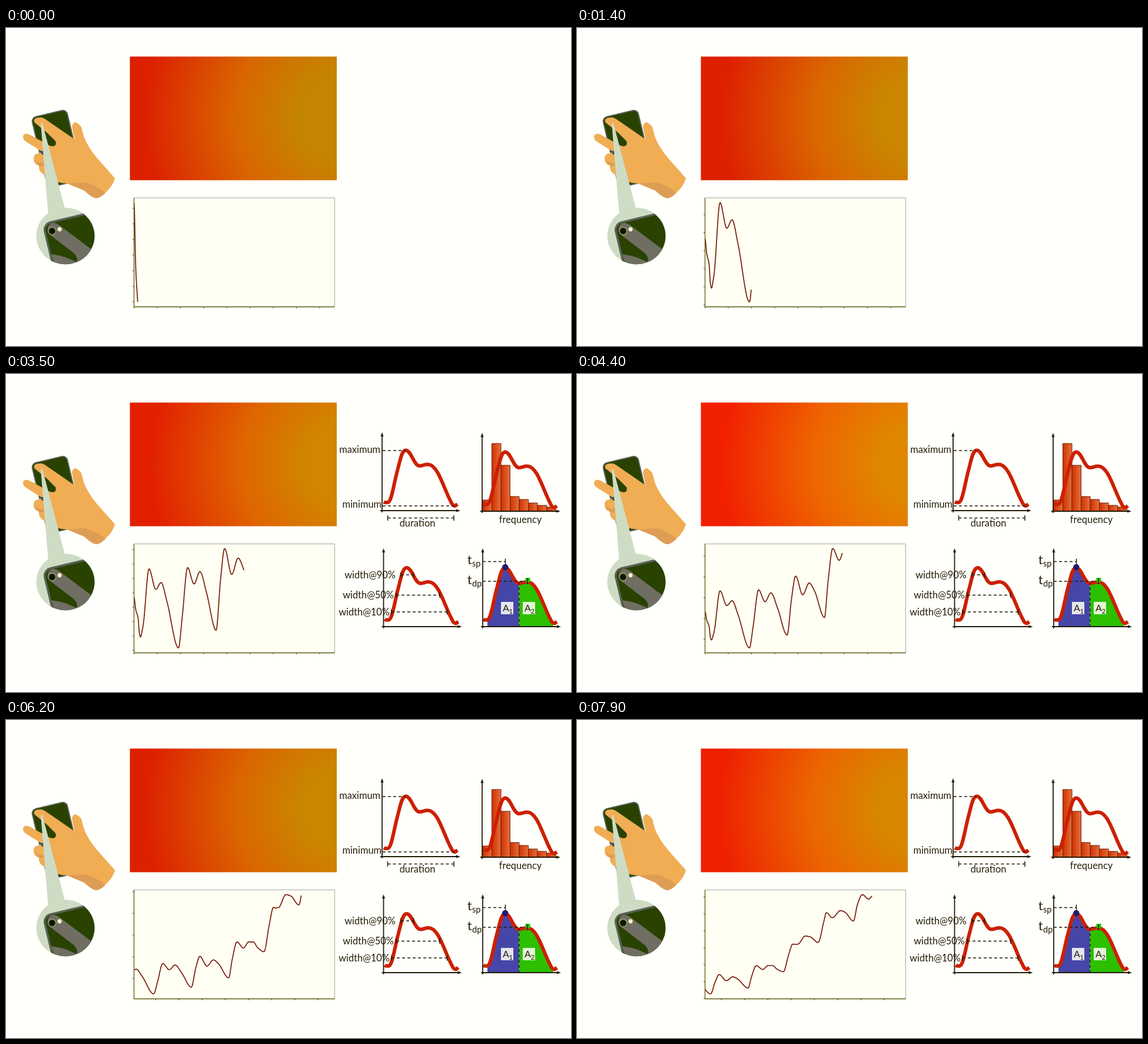
Animation, 960 px wide and 540 px high, one loop 8000 ms. Source, as an HTML page with a canvas:

```html
<!DOCTYPE html>
<html lang="en">
<head>
<meta charset="utf-8">
<title>Pulse wave from a phone camera</title>
<style>
html, body { margin: 0; width: 100%; height: 100%; overflow: hidden; background: #fffffb; }
canvas { display: block; width: 960px; height: 540px; }
</style>
</head>
<body>
<canvas id="stage" width="960" height="540"></canvas>
<script>
const g = document.getElementById('stage').getContext('2d');
const LOOP = 8000, STEP = 100;
const INK = '#241c08', RED = '#cc2000';
const FONT = 'Lato, "Open Sans", sans-serif';

// Turning points of the pulse wave, smoothed by a monotone cubic
const pts = [
  [0, 37], [3, 28], [7, 22], [9, 11], [11, 8], [14, 13], [16, 18], [25.5, 58], [37, 43], [46, 48], [56, 34], [75.5, 0],
  [82, 23], [91, 59], [102, 47], [112, 56], [123.5, 40], [139.5, 13],
  [147, 50], [154, 73], [166, 54], [177, 66], [186, 58], [203, 31],
  [209, 67], [217, 101], [228, 89], [237, 101], [245, 101], [252, 90], [263, 82],
  [272, 135], [279, 168], [283, 167], [288, 168], [300, 193], [309, 190], [322, 173],
  [332, 240], [336, 266], [346, 250], [360, 272], [367, 268], [382, 240],
  [389, 292], [397, 322], [408, 308], [414, 317]
];
const chord = i => (pts[i + 1][1] - pts[i][1]) / (pts[i + 1][0] - pts[i][0]);
const slopes = pts.map((p, i) => {
  if (!i || i === pts.length - 1) return 0;
  const a = chord(i - 1), b = chord(i);
  return a * b > 0 ? 2 * a * b / (a + b) : 0;
});

function wave(x) {
  let i = 0;
  while (i < pts.length - 2 && pts[i + 1][0] < x) i++;
  const h = pts[i + 1][0] - pts[i][0];
  const u = Math.min(1, (x - pts[i][0]) / h), w = 1 - u;
  return w * w * (1 + 2 * u) * pts[i][1] + u * u * (3 - 2 * u) * pts[i + 1][1]
    + h * u * w * (w * slopes[i] - u * slopes[i + 1]);
}

function fill(d, color) { g.fillStyle = color; g.fill(new Path2D(d)); }

function line(x1, y1, x2, y2, color = INK, width = 1.5, dash = []) {
  g.strokeStyle = color; g.lineWidth = width; g.setLineDash(dash);
  g.beginPath(); g.moveTo(x1, y1); g.lineTo(x2, y2); g.stroke();
  g.setLineDash([]);
}
const dashed = (x1, y1, x2, y2) => line(x1, y1, x2, y2, INK, 1.4, [5, 4]);

function text(s, x, y, align = 'left', size = 16.4) {
  g.font = size + 'px ' + FONT; g.textAlign = align; g.fillStyle = INK;
  g.fillText(s, x, y);
}

function disc(x, y, r, color) {
  g.fillStyle = color; g.beginPath(); g.arc(x, y, r, 0, 7); g.fill();
}

function phone(x, y, w, h, r, edge) {
  g.save();
  g.translate(x, y); g.rotate(-0.235);
  g.beginPath(); g.roundRect(0, 0, w, h, r);
  g.fillStyle = '#294200'; g.fill();
  g.lineWidth = edge; g.strokeStyle = '#586054'; g.stroke();
  g.restore();
}

function hand() {
  const skin = '#f0ad54', shade = '#dd9d55';
  fill('M112 168Q113 160 119 160Q124 163 128 168L133 187L118 196Z', skin);
  phone(43, 152.5, 61, 122, 8, 2);
  fill('M48 160Q46 152 57 152Q62 151 70 157L118 190L132 184Q139 202 154 220L185 255Q180 275 155 289'
    + 'Q148 290 133 276L104 264Q80 263 68 250Q55 246 56 234Q47 231 47 223Q46 214 55 213L61 210'
    + 'L34 193Q28 189 29 183Q33 177 40 181L62 193Q72 200 80 201Q87 199 84 192L70 178Z', skin);
  fill('M104 264L135 262Q157 269 169 280Q161 288 155 289Q148 290 133 276Z', shade);
  fill('M47 223Q54 230 65 229L66 233Q57 236 56 234Z', shade);
  fill('M58 210L64 208L66 215L61 215Z', '#40505c');
  fill('M59 161L62 162L101 310L72 320Z', '#cedcc4');
}

function lens() {
  g.save();
  g.beginPath(); g.ellipse(101, 353.2, 49.5, 48, 0, 0, 7); g.clip();
  g.fillStyle = '#cedcc4'; g.fillRect(50, 300, 104, 104);
  phone(63, 333, 130, 150, 13, 3.5);
  fill('M71 346Q69 334 79 331Q86 330 96 339L152 381L128 403L120 397Q123 390 115 382L77 353Z', '#706e62');
  fill('M77 384Q91 386 103 390L124 399L105 406L82 401Z', '#706e62');
  g.restore();
  disc(78.3, 344.8, 7, '#b6b694');
  disc(78.3, 344.8, 6, '#2c3810');
  disc(78.3, 344.8, 4.5, '#101400');
  disc(91, 341.7, 4.2, '#a6a27c');
  disc(91, 341.7, 3.2, '#fff8d0');
}

// Camera picture: time, band shift, red at the left, red at the right
const tones = [
  [0, 0, 220, 196], [1400, 12, 221, 202], [2300, 0, 225, 206], [3500, 12, 226, 208],
  [5300, 14, 255, 240], [6200, 2, 221, 202], [7900, 8, 238, 216]
];
function camera(t) {
  let i = 0;
  while (i < tones.length - 2 && tones[i + 1][0] < t) i++;
  const a = tones[i], b = tones[i + 1], u = (t - a[0]) / (b[0] - a[0]);
  const [, shift, left, right] = a.map((v, j) => v + (b[j] - v) * u);
  const cx = 572 + shift;
  const grad = g.createRadialGradient(cx, 152, 0, cx, 152, 365);
  grad.addColorStop(0.2, `rgb(${right},134,0)`);
  grad.addColorStop(0.5, `rgb(${left - 3},102,0)`);
  grad.addColorStop(0.93, `rgb(${left},32,0)`);
  g.fillStyle = grad;
  g.fillRect(210.5, 48.5, 351.5, 210);
}

const BOX = { l: 217.5, t: 288.5, r: 558.5, b: 473.5 };
const nice = [0.05, 0.1, 0.2, 0.25, 0.5, 1, 2, 2.5, 5];
function chart(t) {
  const head = 6.2 + 0.0516 * t, from = Math.max(0, head - 284);
  const xs = [];
  for (let x = from; x < head; x += 0.75) xs.push(x);
  xs.push(head);
  const vs = xs.map(wave), lo = Math.min(...vs), hi = Math.max(...vs);
  const scale = 168.5 / (hi - lo);
  const py = v => 465 - (v - lo) * scale;

  g.fillStyle = '#fffff4';
  g.fillRect(BOX.l, BOX.t, BOX.r - BOX.l, BOX.b - BOX.t);
  line(BOX.l, BOX.t, BOX.r, BOX.t, '#a8a8a0', 1);
  line(BOX.r, BOX.t, BOX.r, BOX.b, '#a8a8a0', 1);

  g.strokeStyle = '#781c04'; g.lineWidth = 1.7; g.lineJoin = 'round';
  g.beginPath();
  xs.forEach((x, i) => g.lineTo(BOX.l + x - from, py(vs[i])));
  g.stroke();

  const axis = '#5c5c10';
  line(BOX.l, BOX.t, BOX.l, BOX.b + 0.5, axis, 1.3);
  line(BOX.l, BOX.b, BOX.r, BOX.b, axis, 1.3);
  const gap = 39.45;
  for (let x = Math.ceil(from / gap) * gap; x - from < 341; x += gap)
    line(BOX.l + x - from, BOX.b, BOX.l + x - from, BOX.b + 2.5, axis, 1.2);

  const unit = 21.1, zero = -54.5;
  const span = 185 / scale / unit;
  const step = nice.find(s => span / s < 7.8) || 5;
  const bottom = (lo - 8.5 / scale - zero) / unit;
  for (let n = Math.ceil(bottom / step); n * step <= bottom + span; n++) {
    const y = py(zero + n * step * unit);
    line(BOX.l - 2.5, y, BOX.l, y, axis, 1.2);
  }
}

function axes(x, y) {
  const top = y - 133, right = x + 133;
  line(x, y + 3, x, top + 5, INK, 1.8);
  line(x - 3, y, right - 5, y, INK, 1.8);
  fill(`M${x} ${top}l2.6 7h-5.2zM${right} ${y}l-7 2.6v-5.2z`, INK);
}

const PULSE = 'M642 217Q645 219 649 218C655 216 658 192 664 168C670 146 672 130 679 129.5'
  + 'C688 129 693 155 702 156C709 156 711 153 717 153.5C734 154 743 193 756 217Q759 224 763 224L767 221';
function pulse(dx, dy) {
  g.save();
  g.translate(dx, dy);
  g.strokeStyle = RED; g.lineWidth = 6; g.lineJoin = 'round';
  g.stroke(new Path2D(PULSE));
  g.restore();
}

function range(x1, x2, y) {
  dashed(x1, y, x2, y);
  for (const x of [x1, x2]) line(x, y - 4.5, x, y + 4.5);
}

function extremes() {
  pulse(0, 0);
  axes(639, 232);
  dashed(640, 130, 679, 130);
  dashed(640, 224, 767, 224);
  range(648.5, 761, 244.5);
  text('maximum', 636, 134, 'right');
  text('minimum', 638, 227, 'right');
  text('duration', 699, 258.5, 'center');
}

const bars = [19, 115, 78, 25, 20, 14, 10, 7];
function spectrum() {
  const w = 15.5;
  bars.forEach((h, i) => {
    const x = 810 + i * w;
    const grad = g.createLinearGradient(x, 0, x + w, 0);
    grad.addColorStop(0, '#d03000');
    grad.addColorStop(1, '#e4703c');
    g.fillStyle = grad; g.fillRect(x, 233 - h, w, h);
    g.strokeStyle = '#702008'; g.lineWidth = 1; g.strokeRect(x, 233 - h, w, h);
  });
  pulse(169, 3);
  axes(809, 233);
  text('frequency', 874, 253, 'center');
}

function widths() {
  pulse(1.5, 199.5);
  axes(641.5, 429);
  range(671, 692.5, 341);
  range(663, 737, 375.5);
  range(655, 749.5, 404);
  text('width@90%', 662, 346.5, 'right');
  text('width@50%', 659, 380.5, 'right');
  text('width@10%', 652, 410, 'right');
}

function label(main, sub, x, y, size, gap) {
  text(main, x, y, 'left', size);
  text(sub, x + gap, y + 4, 'left', size * 0.7);
}

function areas() {
  g.save();
  g.translate(169, 199.5);
  g.clip(new Path2D(PULSE + 'L760 229.5H649V218Z'));
  g.fillStyle = '#4646a8'; g.fillRect(649, 120, 53.5, 110);
  g.fillStyle = '#2cc000'; g.fillRect(702.5, 120, 58, 110);
  g.restore();
  pulse(169, 199.5);
  axes(810, 429);
  dashed(810, 318.5, 849, 318.5);
  line(848.5, 313.5, 848.5, 323.5);
  dashed(810, 352, 886, 352);
  dashed(871.7, 353, 871.7, 429);
  disc(848.3, 328, 5.2, '#1c1c70');
  g.fillStyle = '#20c800'; g.fillRect(882.5, 346, 8, 8);
  line(886, 347, 886, 357);
  [841, 878].forEach((x, i) => {
    g.fillStyle = 'rgba(255,255,250,.86)';
    g.fillRect(x, 387, 21, 21);
    label('A', i + 1, x + 3, 402.5, 16, 10.5);
  });
  label('t', 'sp', 784, 323, 21, 8);
  label('t', 'dp', 784, 357, 21, 8);
}

const panels = [extremes, spectrum, widths, areas];

function draw(t) {
  g.fillStyle = '#fffffb';
  g.fillRect(0, 0, 960, 540);
  hand();
  lens();
  camera(t);
  chart(t);
  panels.forEach((paint, i) => { if (t >= 1900 + 500 * i) paint(); });
}

const begin = performance.now();
function tick() {
  const t = (performance.now() - begin) % LOOP;
  draw(Math.floor(t / STEP) * STEP);
  requestAnimationFrame(tick);
}
tick();
</script>
</body>
</html>
```
